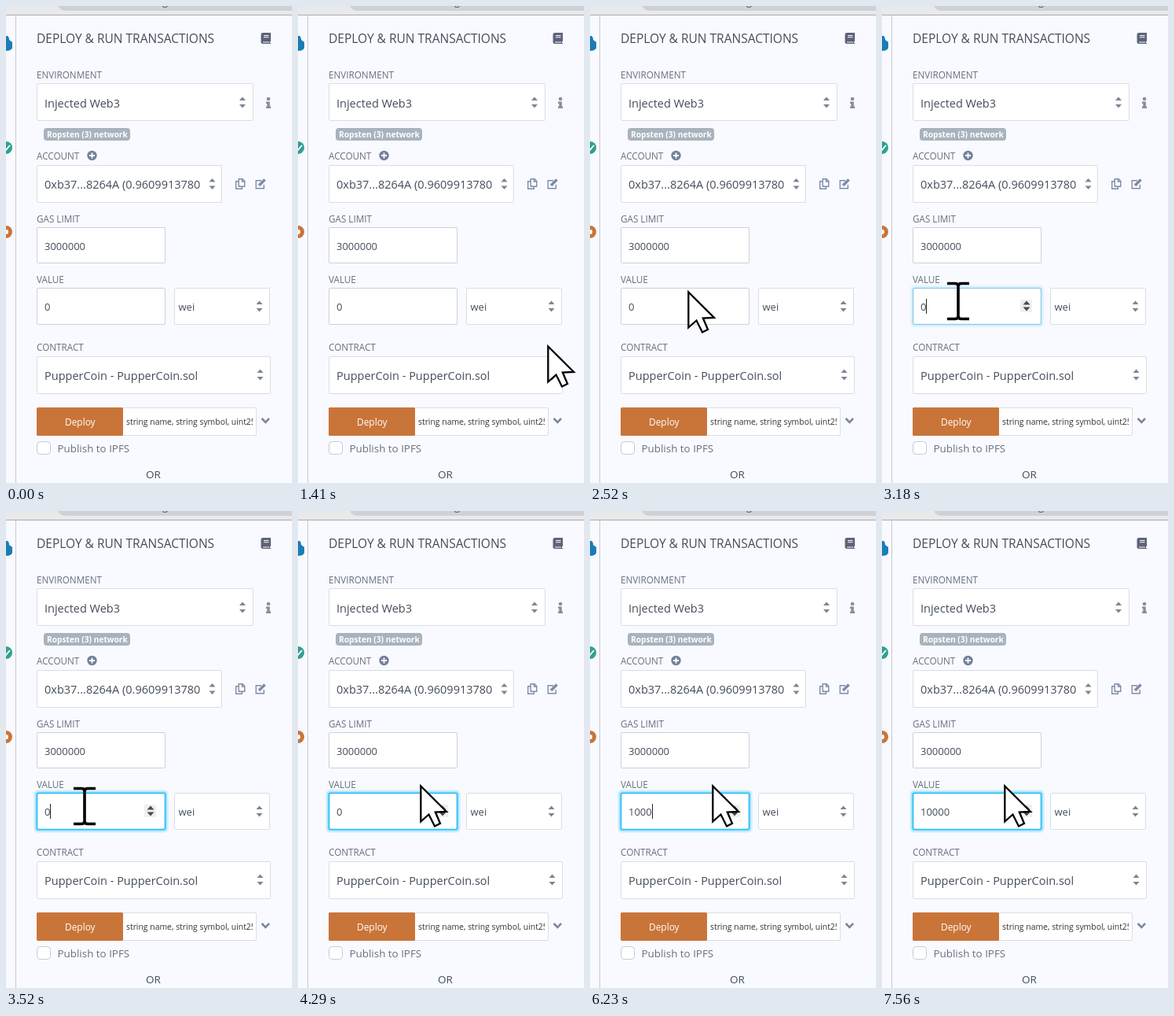
An HTML page that plays this animation: 364 px wide and 606 px high, repeating every 8 s.

```html
<!DOCTYPE html>
<html lang="en">
<head>
<meta charset="utf-8">
<title>Deploy panel</title>
<style>
  html, body { margin: 0; width: 100%; height: 100%; overflow: hidden; background: #f9faff; }
  svg { display: block; }
  text { font-family: "Open Sans", "Noto Sans", sans-serif; fill: #444d5b; white-space: pre; }
  .title { font-size: 15.5px; }
  .label { font-size: 11.7px; fill: #667080; }
  .select { font-size: 14.5px; }
  .field { font-size: 13px; }
  .box { fill: #fff; stroke: #d9dee5; }
  .input { fill: #fff; stroke: #cbd1da; }
  .glow rect { fill: none; stroke: #22bdf5; }
</style>
</head>
<body>
<svg id="stage" width="364" height="606" viewBox="0 0 364 606">
  <defs>
    <path id="sort" d="M-4 -2.5L0 -7L4 -2.5ZM-4 2.5L0 7L4 2.5Z" fill="#7b8593"/>
  </defs>

  <rect width="364" height="606" fill="#f9faff"/>

  <!-- browser edge -->
  <rect width="364" height="11" fill="#e8e9eb"/>
  <path d="M66 0H364V6H76Q69 6 66 0Z" fill="#d0d1d4"/>
  <text x="199" y="-1" font-size="13">g</text>
  <path d="M0 11.5H364" stroke="#a9abaf"/>
  <path d="M12.5 12V606" stroke="#c6c9ce"/>

  <!-- side badges -->
  <path d="M0 38H2Q4 39 4 43L8 46V53Q7 57 0 57Z" fill="#1b7db5"/>
  <circle cx="0" cy="180" r="8" fill="#30a08f"/>
  <path d="M-3 180L0 183L5 177" fill="none" stroke="#fff" stroke-width="1.8"/>
  <circle cx="0" cy="287" r="8" fill="#c97539"/>
  <circle cx="0" cy="287" r="3" fill="#fff"/>

  <text class="title" x="39" y="47">DEPLOY &amp; RUN TRANSACTIONS</text>
  <g>
    <path d="M327 34H337V45H336V47H337V48H327Q324.500 48 324.500 45.500V36.500Q324.500 34 327 34Z" fill="#5c6278"/>
    <path d="M328 37.500H334.500M328 39.700H334.500M327 46H335" stroke="#f9faff"/>
  </g>

  <text class="label" x="39" y="92">ENVIRONMENT</text>
  <rect class="box" x="39.500" y="98.500" width="275" height="47" rx="1.500"/>
  <text class="select" x="49" y="129">Injected Web3</text>
  <use href="#sort" x="301" y="122.500"/>
  <g fill="#858e9e">
    <circle cx="334" cy="118" r="2.300"/>
    <path d="M331 121.500H335.800V127.500H337V130H331V127.500H332.300V124H331Z"/>
  </g>
  <rect x="48" y="155" width="110" height="16" rx="4" fill="#a8b3bd"/>
  <text x="52" y="166.700" font-size="10.2" font-weight="700" style="fill:#fff">Ropsten (3) network</text>

  <text class="label" x="39" y="195">ACCOUNT</text>
  <circle cx="109.500" cy="190" r="6.200" fill="#74819a"/>
  <path d="M106 190H113M109.500 186.500V193.500" stroke="#fff" stroke-width="1.800"/>
  <rect class="box" x="39.500" y="202.500" width="235" height="47" rx="1.500"/>
  <text class="select" x="49" y="231.500">0xb37...8264A (0.9609913780</text>
  <use href="#sort" x="262.500" y="226"/>
  <g fill="none" stroke="#7d8ca6" stroke-width="1.400">
    <path d="M296.200 219.700H301L303.800 222.500V229.300H296.200ZM300.500 220V223H303.500M296 222.700H292.700V232.300H300.300V229.500"/>
    <path d="M325 221.700H318.200V231.800H328.300V227"/>
    <path d="M322 228L329.500 220.500" stroke-width="3.500"/>
  </g>

  <text class="label" x="39" y="275">GAS LIMIT</text>
  <rect class="input" x="39.500" y="281.500" width="163" height="45" rx="1.500"/>
  <text class="field" x="49" y="309.500">3000000</text>

  <text class="label" x="39" y="352">VALUE</text>
  <rect class="input" x="39.500" y="358.500" width="163" height="46" rx="1.500"/>
  <g id="glow" class="glow">
    <rect x="37" y="356" width="168" height="51" rx="4" stroke-width="4" opacity=".14"/>
    <rect x="38" y="357" width="166" height="49" rx="3" stroke-width="2" opacity=".3"/>
    <rect x="39.500" y="358.500" width="163" height="46" rx="2" stroke-width="1.600"/>
  </g>
  <g id="spin">
    <rect x="176" y="373" width="15" height="16" fill="#efefef"/>
    <path d="M179.500 379.500L184 374.500L188.500 379.500ZM179.500 382.500L184 387.500L188.500 382.500Z" fill="#4a4a4a"/>
  </g>
  <text id="value" class="field" x="49" y="386.500">0</text>
  <rect id="caret" y="372" width="1" height="19" fill="#222"/>
  <rect class="box" x="214.500" y="358.500" width="121" height="46" rx="1.500"/>
  <text class="field" x="219.500" y="386.500">wei</text>
  <use href="#sort" x="322.500" y="381.500"/>

  <text class="label" x="39" y="438">CONTRACT</text>
  <rect class="box" x="39.500" y="445.500" width="297" height="47" rx="1.500"/>
  <text class="select" x="49" y="475">PupperCoin - PupperCoin.sol</text>
  <use href="#sort" x="323.500" y="468.500"/>

  <rect class="box" x="148.500" y="510.500" width="170" height="35" rx="1.500"/>
  <rect x="39" y="510" width="110" height="36" rx="1.500" fill="#c97539"/>
  <text x="75" y="533" font-size="11.9" style="fill:#fff">Deploy</text>
  <svg x="152" y="511" width="162" height="34">
    <text x="1" y="20.500" font-size="10.4" style="fill:#333">string name, string symbol, uint256 initial_supply</text>
  </svg>
  <path d="M325.500 524L330.300 528.800L335 524" fill="none" stroke="#7a889e" stroke-width="2.600"/>

  <rect x="39.500" y="553.500" width="17" height="16" rx="4" fill="#fff" stroke="#c3cad4"/>
  <text x="65.500" y="567" font-size="13.4" style="fill:#667080">Publish to IPFS</text>
  <text x="178" y="600" font-size="13.5">OR</text>

  <path id="arrow" d="M.3 2.500V47.500L10.500 38.500L18 53.500L25 50L18.800 35.500L33 35Z" fill="#fff" stroke="#000" stroke-width="2.300"/>
  <path id="beam" d="M-14 -22.500H-4Q0 -22.500 0 -19Q0 -22.500 4 -22.500H14M0 -21V21M-14 22.500H-4Q0 22.500 0 19Q0 22.500 4 22.500H14" fill="none" stroke="#000" stroke-width="3.600"/>
</svg>
<script>
  const LOOP = 8000;
  const $ = id => document.getElementById(id);
  const arrow = $('arrow'), beam = $('beam'), glow = $('glow');
  const spin = $('spin'), value = $('value'), caret = $('caret');

  // [time, x, y, text pointer?]
  const moves = [
    [0, 284, 620], [530, 319, 598],
    [1170, 323, 575], [1290, 324, 505], [1410, 318, 430], [1510, 305, 372],
    [1620, 290, 330], [1740, 276, 306], [1850, 270, 299],
    [2180, 262, 303], [2290, 222, 320], [2410, 170, 343], [2520, 125, 361],
    [2630, 108, 372, 1], [2740, 100, 375, 1], [2860, 97, 375, 1],
    [3400, 98, 375, 1], [3520, 100, 375, 1], [3610, 135, 373, 1], [3730, 156, 347]
  ];

  // [time, typed text, caret visible]
  const typing = [
    [0, '0', 0], [3180, '0', 1], [4290, '0', 0], [4700, '0', 1], [4820, '', 1],
    [5270, '1', 1], [5920, '10', 1], [6130, '100', 1], [6230, '1000', 1],
    [6800, '1000', 0], [7000, '10000', 1], [7560, '10000', 0]
  ];

  // [time, glow opacity]
  const focus = [[0, 0], [3180, 0.35], [3290, 0.85], [3400, 1]];

  const at = (track, t) => track.findLast(key => key[0] <= t);
  const show = (el, on) => el.setAttribute('visibility', on ? 'visible' : 'hidden');

  function draw(t) {
    const [, x, y, isText] = at(moves, t);
    const place = `translate(${x} ${y})`;
    arrow.setAttribute('transform', place);
    beam.setAttribute('transform', place);
    show(arrow, !isText);
    show(beam, isText);

    const [, text, blink] = at(typing, t);
    if (value.textContent !== text) value.textContent = text;
    caret.setAttribute('x', Math.round(49 + 7.45 * text.length));
    show(caret, blink);

    glow.setAttribute('opacity', at(focus, t)[1]);
    show(spin, t >= 2630);
  }

  let start;
  function tick(now) {
    start ??= now;
    draw((now - start) % LOOP);
    requestAnimationFrame(tick);
  }
  draw(0);
  requestAnimationFrame(tick);
</script>
</body>
</html>
```
